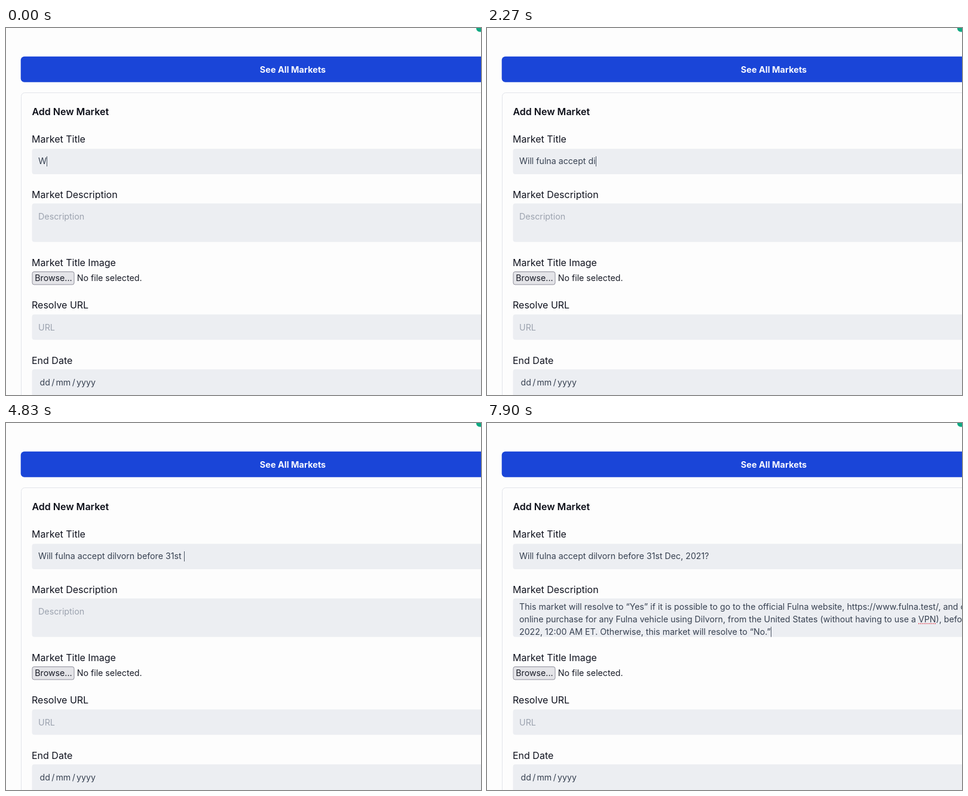
Write an HTML page that moves like this. It is 795 by 615 pixels and loops after 8000 ms.

```html
<!DOCTYPE html>
<html lang="en">
<head>
<meta charset="utf-8">
<title>Add New Market</title>
<style>
  html, body { margin: 0; width: 100%; height: 100%; overflow: hidden; background: #fdfdfd; }
  svg { display: block; font-family: Inter, sans-serif; }
  text { white-space: pre; }
  .label { font-size: 16px; fill: #10131f; }
  .head { font-size: 16px; font-weight: 600; fill: #0b0d17; }
  .value { font-size: 14.2px; fill: #374151; }
  .hint { font-size: 14.3px; fill: #9ca3af; }
  .file { font-size: 14.2px; fill: #181b26; }
  .button { font-size: 14.5px; font-weight: 700; fill: #f8f9ff; text-anchor: middle; }
  .field { fill: #eceef2; }
</style>
</head>
<body>
<svg id="stage" width="795" height="615" viewBox="0 0 795 615">
  <rect width="795" height="615" fill="#fdfdfd"/>
  <rect x="787" y="-36" width="120" height="42.5" rx="6" fill="#0fa982"/>
  <rect x="24.7" y="47.7" width="910" height="43.1" rx="6" fill="#1a45d8"/>
  <text class="button" x="480" y="74.8">See All Markets</text>
  <rect x="25.5" y="108.5" width="909" height="700" rx="6" fill="none" stroke="#e2e4ea"/>
  <text class="head" x="43.4" y="145.8">Add New Market</text>
  <g id="form"></g>
  <rect x="44" y="408.5" width="70" height="21.5" rx="3" fill="#e4e4e8" stroke="#8f8f9b"/>
  <text class="file" x="48.3" y="424.4">Browse...</text>
  <text class="file" x="118.8" y="424.4">No file selected.</text>
  <text id="title" class="value" x="54" y="228.4"></text>
  <text id="hint" class="hint" x="54" y="320.8">Description</text>
  <text class="hint" x="54" y="506.6">URL</text>
  <g id="date"></g>
  <g id="details"></g>
  <line id="squiggle" stroke="#e0404f" stroke-width="1.6" stroke-dasharray="1.7 1.7"/>
  <rect id="caret" width="1" height="17" fill="#4b5563"/>
</svg>
<script>
const LOOP = 8000, LEFT = 54, BLINK = 500;
const FOCUS = 6500, PASTE = 6770, CHECKED = 6830;
const TITLE = "Will fulna accept dilvorn before 31st Dec, 2021?";
const DETAILS = [
  "This market will resolve to “Yes” if it is possible to go to the official Fulna website, https://www.fulna.test/, and complete",
  "online purchase for any Fulna vehicle using Dilvorn, from the United States (without having to use a VPN), before January",
  "2022, 12:00 AM ET. Otherwise, this market will resolve to “No.”"
];
// [time, characters typed]
const KEYS = [
  [0, 1], [370, 5], [630, 8], [830, 9], [980, 11], [1110, 12], [1600, 16],
  [1670, 17], [1830, 18], [1970, 19], [2200, 20], [2330, 21], [2730, 25],
  [2870, 26], [3050, 27], [3770, 31], [3880, 32], [5940, 46], [6070, 47], [6240, 48]
];

const $ = id => document.getElementById(id);
const pen = document.createElement("canvas").getContext("2d");

function add(parent, tag, attrs, text = "") {
  const el = document.createElementNS("http://www.w3.org/2000/svg", tag);
  for (const k in attrs) el.setAttribute(k, attrs[k]);
  el.textContent = text;
  parent.appendChild(el);
}

function widthOf(text) {
  pen.font = "14.2px Inter, sans-serif";
  return pen.measureText(text).width;
}

const label = (text, y) => add($("form"), "text", { class: "label", x: 43, y }, text);
const field = (y, height) =>
  add($("form"), "rect", { class: "field", x: 43.5, y, width: 873, height, rx: 4 });

label("Market Title", 192);
label("Market Description", 284.8);
label("Market Title Image", 398.5);
label("Resolve URL", 470.3);
label("End Date", 562.9);
field(202.5, 42.5);
field(294, 64.5);
field(480, 42.5);
field(572, 48);

[["dd", 56.5], ["/", 76.2], ["mm", 83.4], ["/", 110.8], ["yyyy", 118]].forEach(([text, x]) =>
  add($("date"), "text", { class: "value", x, y: 599 }, text));
DETAILS.forEach((line, i) =>
  add($("details"), "text", { class: "value", x: LEFT, y: 312.6 + i * 21.3 }, line));

// Characters typed at t, and the time of the latest keystroke
function typed(t) {
  let i = 0;
  while (i < KEYS.length - 1 && KEYS[i + 1][0] <= t) i++;
  const [t0, n0] = KEYS[i];
  if (i === KEYS.length - 1) return { count: n0, last: t0 };
  const [t1, n1] = KEYS[i + 1];
  const step = (t1 - t0) / (n1 - n0);
  const extra = Math.floor((t - t0) / step);
  return { count: n0 + extra, last: t0 + extra * step };
}

const show = (el, on) => el.setAttribute("visibility", on ? "visible" : "hidden");

function draw(t) {
  const { count, last } = typed(t);
  const text = TITLE.slice(0, count);
  const pasted = t >= PASTE;
  $("title").textContent = text;
  show($("hint"), !pasted);
  show($("details"), pasted);

  const before = DETAILS[1].slice(0, DETAILS[1].indexOf("VPN"));
  const x = LEFT + widthOf(before);
  const line = $("squiggle");
  line.setAttribute("x1", x);
  line.setAttribute("x2", x + widthOf("VPN"));
  line.setAttribute("y1", 336.2);
  line.setAttribute("y2", 336.2);
  show(line, t >= CHECKED);

  let caretX = LEFT + widthOf(text), caretY = 215, since = last;
  if (pasted) {
    caretX = LEFT + widthOf(DETAILS[2]);
    caretY = 341.5;
    since = PASTE;
  } else if (t >= FOCUS) {
    caretX = LEFT;
    caretY = 307.5;
    since = FOCUS;
  }
  const caret = $("caret");
  caret.setAttribute("x", Math.round(caretX));
  caret.setAttribute("y", caretY);
  show(caret, Math.floor((t - since) / BLINK) % 2 === 0);
}

const start = performance.now();
function tick(now) {
  draw(Math.max(0, now - start) % LOOP);
  requestAnimationFrame(tick);
}
draw(0);
requestAnimationFrame(tick);
</script>
</body>
</html>
```
